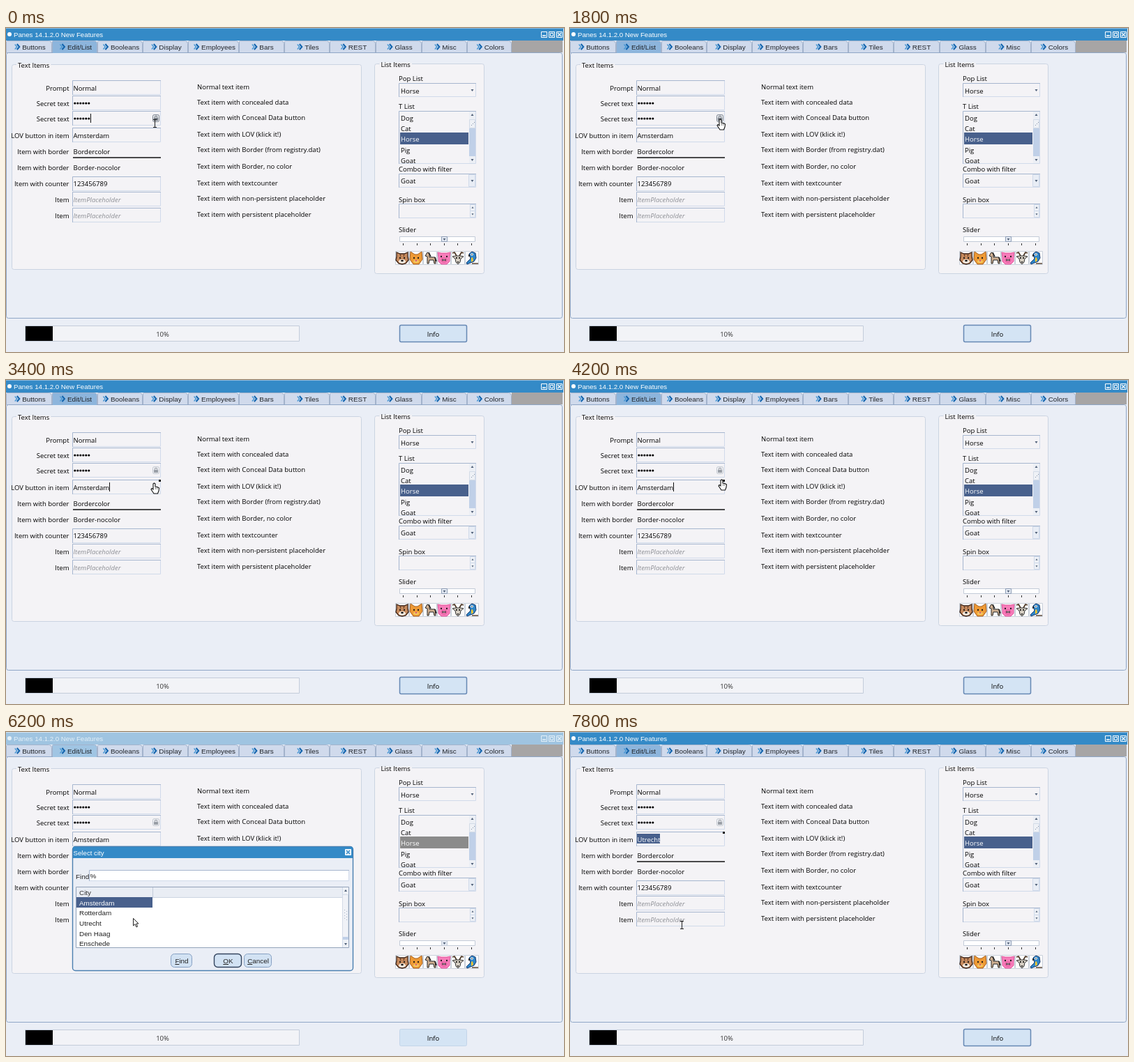
Write an HTML page with a canvas that moves like this. It is 800x465 px and loops after 8000 ms.

```html
<!DOCTYPE html>
<html lang="en">
<head>
<meta charset="utf-8">
<title>New Features</title>
<style>
  html, body { margin: 0; width: 100%; height: 100%; overflow: hidden; background: #eaeef6; }
  canvas { display: block; }
</style>
</head>
<body>
<canvas id="stage" width="800" height="465"></canvas>
<script>
const ctx = document.getElementById('stage').getContext('2d');
const SANS = '9.5px "Open Sans", sans-serif';
const ARIAL = '9.9px "Liberation Sans", Arial, sans-serif';
const TITLE = '9.7px "Liberation Sans", Arial, sans-serif';
const BLUE = '#348ac7', BG = '#eaeef6', PANEL = '#f4f3f6', NAVY = '#48608c';
const EDGE = '#a6b6cf', PALE = '#d0daea', TRACK = '#c0d0e8', INK = '#000';

const LOOP = 8000, TICK = 200;
const REVEAL = 800, CONCEAL = 1800, FOCUS_CITY = 3400, OPEN = 4600, PICK = 7000, CLOSE = 7600;

// Pointer stops: time, x, y of the hot spot, shape.
const stops = [
  [0, 213, 137, 'beam'], [400, 214, 130, 'hand'], [1200, 216, 128, 'hand'],
  [1800, 215, 131, 'hand'], [2200, 203, 145, 'beam'], [2600, 189, 152, 'beam'],
  [3000, 191, 152, 'beam'], [3400, 212, 148, 'hand'], [3800, 220, 144, 'hand'],
  [4600, 214, 142, 'arrow'], [5200, 214, 142, 'arrow'], [6200, 182, 267, 'arrow'],
  [6800, 162, 274, 'arrow'], [7600, 160, 277, 'beam'], [8000, 160, 277, 'beam']
];

function rect(x, y, w, h, color) {
  ctx.fillStyle = color;
  ctx.fillRect(x, y, w, h);
}

function paint(fill, stroke, width = 1) {
  if (fill) { ctx.fillStyle = fill; ctx.fill(); }
  if (stroke) { ctx.strokeStyle = stroke; ctx.lineWidth = width; ctx.stroke(); }
}

function box(x, y, w, h, fill, stroke, radius = 0, width = 1) {
  ctx.beginPath();
  ctx.roundRect(x + .5, y + .5, w - 1, h - 1, radius);
  paint(fill, stroke, width);
}

function trace(points) {
  ctx.beginPath();
  for (let i = 0; i < points.length; i += 2) ctx.lineTo(points[i], points[i + 1]);
}

function line(points, color, width) {
  trace(points);
  paint(null, color, width);
}

function poly(points, fill, stroke, width) {
  trace(points);
  ctx.closePath();
  paint(fill, stroke, width);
}

function oval(x, y, rx, ry, fill, stroke) {
  ctx.beginPath();
  ctx.ellipse(x, y, rx, ry, 0, 0, 7);
  paint(fill, stroke);
}

// y is the middle of the capital letters.
function text(s, x, y, color = INK, font = SANS, align = 'left') {
  ctx.font = font;
  ctx.textAlign = align;
  ctx.fillStyle = color;
  ctx.fillText(s, x, Math.round(y + 3.6));
}

function triangle(x, y, dir, size = 2, color = '#506078') {
  poly([x - size, y - dir * size / 2, x + size, y - dir * size / 2, x, y + dir * size / 2 + dir], color);
}

function cross(x, y, color) {
  line([x, y, x + 5, y + 5], color, 1.3);
  line([x + 5, y, x, y + 5], color, 1.3);
}

function field(x, y, w, h, fill = PANEL) {
  box(x, y, w, h, fill, PALE);
  line([x + .5, y + h, x + .5, y + .5, x + w, y + .5], EDGE);
}

function windowFrame(active) {
  const light = active ? '#fff' : '#e4f0f8';
  rect(0, 0, 800, 465, BG);
  rect(0, 1, 799, 17, active ? BLUE : '#9fc4e1');
  rect(0, 0, 800, 1, active ? '#8fb9dc' : '#d5e4f0');
  oval(5, 9, 3, 3, light);
  text('Panes 14.1.2.0 New Features', 11, 9, light, TITLE);
  for (const x of [767, 778, 789]) box(x, 5, 9, 9, null, light);
  line([769, 11, 774, 11], light, 1.5);
  box(780, 7, 5, 5, null, light);
  cross(791, 7, light);
}

function tabs(active) {
  const names = ['Buttons', 'Edit/List', 'Booleans', 'Display', 'Employees', 'Bars', 'Tiles', 'REST', 'Glass', 'Misc', 'Colors'];
  const edges = [0, 66, 131, 196, 261, 334, 399, 464, 530, 596, 661, 725];
  const current = active ? '#8db5dc' : '#a0c5e3';
  rect(725, 18, 73, 17, '#a7a5a5');
  names.forEach((name, i) => {
    const x = edges[i], w = edges[i + 1] - x, center = x + w / 2 + 7;
    box(x, 18, w, 18, i === 1 ? current : '#d0daec', '#a3b3cc', [1, 4, 0, 0]);
    text(name, center, 27, '#22262c', ARIAL, 'center');
    const left = center - ctx.measureText(name).width / 2 - 10.5;
    line([left, 23.5, left + 3, 27, left, 30.5], '#4b9ad6', 1.5);
    line([left + 3, 23, left + 6.5, 27, left + 3, 31], '#1264ae', 2);
  });
  box(0, 35, 798, 382, BG, '#8fa6c6', 3);
  line([67, 35.5, 130, 35.5], current);
}

function group(x, y, w, h, title, titleX) {
  box(x, y, w, h, PANEL, '#cbd4e2', 3);
  ctx.font = SANS;
  rect(titleX - 2, y - 1, ctx.measureText(title).width + 4, 4, PANEL);
  text(title, titleX, y + 1);
}

function dots(y) {
  for (let i = 0; i < 6; i++) oval(98.8 + i * 4, y, 1.6, 1.6, INK);
}

function lockIcon(hover, open) {
  const metal = hover ? '#777d86' : '#9a9fa7';
  box(210, 124, 10, 11, hover ? '#e3e6ea' : '#eeeff3', hover ? '#7c8490' : '#c3c8d0', 2);
  rect(212, 129, 6, 4, metal);
  line([213.5, 129, 213.5, 126.5, 216.5, 126.5, 216.5, open ? 127 : 129], metal);
}

function textItems(t) {
  group(8, 52, 502, 295, 'Text Items', 17);
  const rows = [
    ['Prompt', 'Normal text item', 86, 84],
    ['Secret text', 'Text item with concealed data', 108, 106],
    ['Secret text', 'Text item with Conceal Data button', 130, 128.5],
    ['LOV button in item', 'Text item with LOV (klick it!)', 154, 152],
    ['Item with border', 'Text item with Border (from registry.dat)', 177, 174.5],
    ['Item with border', 'Text item with Border, no color', 200.5, 198],
    ['Item with counter', 'Text item with textcounter', 223.5, 222],
    ['Item', 'Text item with non-persistent placeholder', 246, 244],
    ['Item', 'Text item with persistent placeholder', 269, 267]
  ];
  const values = ['Normal', null, null, null, 'Bordercolor', 'Border-nocolor', '123456789', 'ItemPlaceholder', 'ItemPlaceholder'];
  rows.forEach(([label, note, y, noteY], i) => {
    text(label, 90.5, y, INK, SANS, 'right');
    text(note, 274, noteY);
    if (i < 4 || i > 5) field(95, Math.round(y) - 11, 127, 21);
    if (values[i]) text(values[i], 96.5, y, i > 6 ? '#8e9096' : INK, i > 6 ? 'italic ' + SANS : SANS);
  });
  line([96, 186, 222, 186], '#111', 1.6);
  dots(108);

  const revealed = t >= REVEAL && t < CONCEAL;
  if (revealed) text('Secret', 96.5, 130); else dots(130);
  if (t < 400) line([121.5, 123, 121.5, 136], '#111');
  lockIcon(t < 2200, revealed);

  const chosen = t >= CLOSE;
  if (chosen) rect(96, 146, 33, 14, NAVY);
  text(chosen ? 'Utrecht' : 'Amsterdam', 96.5, 154, chosen ? '#fff' : INK);
  if (chosen || (t >= FOCUS_CITY && t < OPEN)) {
    rect(219, 143, 3, 3, '#111');
    if (!chosen) line([148.5, 147, 148.5, 160], '#111');
  }
}

function animals() {
  for (let i = 0; i < 6; i++) box(558 + i * 20, 320, 20, 20, '#fcfcfc', '#c9d0da');
  const eyes = (x, y, gap = 3) => { oval(x - gap, y, 1, 1.2, '#111'); oval(x + gap, y, 1, 1.2, '#111'); };
  // fox
  poly([560, 322, 565, 324, 571, 324, 576, 322, 576, 328, 577, 333, 573, 338, 568, 339, 563, 338, 559, 333, 560, 328], '#c58a5e', '#3a2116', 1.3);
  oval(568, 335, 5, 3, '#f4eadf');
  line([565, 324, 566, 328], '#5b3420');
  line([571, 324, 570, 328], '#5b3420');
  eyes(568, 330);
  oval(568, 334, 1.8, 1.2, '#111');
  // cat
  poly([580, 321, 586, 325, 590, 325, 596, 321, 597, 332, 592, 339, 584, 339, 579, 332], '#ee9a35', '#a65f1e');
  eyes(588, 330);
  oval(588, 335, 4, 2.2, '#f4c85d');
  oval(588, 334, 1.5, 1, '#d7537c');
  // horse
  poly([601, 327, 604, 322, 607, 324, 607, 329, 615, 329, 616, 338, 614, 338, 613, 333, 607, 333, 606, 338, 604, 338, 604, 328], '#d0b193', '#222');
  line([606, 322, 609, 328], '#222', 1.6);
  line([615, 329, 617, 335], '#222', 1.6);
  // pig
  poly([619, 322, 624, 323, 632, 323, 637, 322, 636, 329, 636, 335, 632, 339, 624, 339, 620, 335, 620, 329], '#f77dba', '#e0559c');
  eyes(628, 328, 4);
  oval(628, 333, 4, 2.8, '#fba4cf', '#d8408c');
  eyes(628, 333, 1.5);
  // goat
  line([640, 323, 643, 322, 646, 327], '#4f3a28', 1.8);
  line([656, 323, 653, 322, 650, 327], '#4f3a28', 1.8);
  poly([640, 328, 645, 327, 651, 327, 656, 328, 652, 331, 651, 336, 648, 339, 645, 336, 644, 331], '#d8d1c5', '#333');
  eyes(648, 330, 2);
  oval(648, 336, 1.5, 1, '#333');
  // parrot
  poly([664, 324, 668, 321, 673, 323, 674, 330, 671, 335, 661, 339, 660, 337, 666, 331], '#2f86c8', '#173a70');
  line([668, 338, 677, 338], '#5b4636', 1.5);
  poly([667, 330, 669, 329, 670, 334, 667, 336], '#f1c52e');
  oval(668, 325, 2, 1.7, '#fff');
  oval(668, 325, .8, .8, '#111');
  line([664, 325, 664, 328], '#222', 1.8);
}

function listItems(active) {
  group(528, 51, 158, 302, 'List Items', 537.5);
  text('Pop List', 563, 72.5);
  field(563, 79, 111, 20);
  text('Horse', 566, 90);
  triangle(668.5, 89, 1);

  text('T List', 563, 112.5);
  field(563, 119, 111, 76);
  ctx.save();
  ctx.beginPath();
  ctx.rect(563, 119, 111, 75);
  ctx.clip();
  rect(565, 150, 98, 17, active ? NAVY : '#8b8b8b');
  ['Dog', 'Cat', 'Horse', 'Pig', 'Goat'].forEach((name, i) =>
    text(name, 566, 129 + i * 15.4, i === 2 ? '#fff' : INK));
  ctx.restore();
  rect(664, 120, 9, 74, '#eceff5');
  rect(664, 144, 9, 40, TRACK);
  box(664, 131, 9, 13, '#eef1f6', '#d3dbe7');
  for (let i = 0; i < 3; i++) rect(667 + i * 2, 139 - i * 2, 1, 1, '#8795aa');
  triangle(668.5, 125, -1);
  triangle(668.5, 189, 1);

  text('Combo with filter', 563, 202.5);
  field(563, 209, 111, 20);
  box(663, 210, 10, 18, '#e8edf5', PALE);
  text('Goat', 566, 219.5);
  triangle(668.5, 219, 1);

  text('Spin box', 563, 246);
  field(563, 252, 111, 21);
  box(665, 253, 8, 10, '#eef1f6', PALE);
  box(665, 262, 8, 10, '#eef1f6', PALE);
  triangle(669, 258, -1, 1.5);
  triangle(669, 267, 1, 1.5);

  text('Slider', 563, 289.5);
  box(564, 299, 109, 8, '#fff', '#c3cbd8');
  box(624, 299, 9, 8, '#e4eaf3', active ? '#8d9db5' : '#c3cbd8');
  triangle(628.5, 303, 1, 2);
  for (let i = 0; i < 6; i++) rect(569 + Math.round(i * 19.5), 309, 1, 3, '#333');
  animals();
}

function footer(active) {
  box(27, 427, 394, 23, '#f2f3f7', '#c3ccda');
  rect(28, 428, 39, 21, '#000');
  text('10%', 224.5, 439.5, '#333', SANS, 'center');
  box(564, 426, 97, 25, '#d4e4f4', active ? '#6688b4' : '#c3d5e9', 2, active ? 1.5 : 1);
  text('Info', 612.5, 439.5, INK, SANS, 'center');
}

function dialogButton(label, x, w, isDefault) {
  const center = x + w / 2 + .5;
  box(x, 318, w, 20, '#d2e2f3', isDefault ? '#34455f' : '#86a0c2', 5, isDefault ? 1.4 : 1);
  text(label, center, 328, '#222', ARIAL, 'center');
  const left = center - ctx.measureText(label).width / 2;
  line([left, 333.5, left + ctx.measureText(label[0]).width, 333.5], '#222');
}

function dialog(selected) {
  box(95, 164, 403, 179, BG, '#4a7fb0', 4, 1.4);
  rect(96, 165, 401, 16, BLUE);
  text('Select city', 96.5, 173, '#fff', TITLE);
  box(486, 168, 9, 9, '#dcebf6', '#fff');
  cross(488, 170, BLUE);

  text('Find', 100, 207, '#222', ARIAL);
  field(119, 198, 373, 16, '#fff');
  text('%', 120.5, 206.5, '#222', ARIAL);

  box(100, 222, 392, 88, '#fff', '#93a3ba');
  rect(101, 223, 381, 14, '#e9edf4');
  line([101, 237.5, 482, 237.5], '#ccd5e2');
  line([210.5, 223, 210.5, 237], '#c3ccda');
  text('City', 105, 230.5, '#333', ARIAL);
  rect(101, 237 + Math.round(selected * 14.7), 109, 15, NAVY);
  ['Amsterdam', 'Rotterdam', 'Utrecht', 'Den Haag', 'Enschede'].forEach((city, i) =>
    text(city, 105, 245 + i * 14.7, i === selected ? '#fff' : '#222', ARIAL));

  rect(482, 223, 9, 86, '#eef1f6');
  line([482.5, 223, 482.5, 309], PALE);
  box(482, 233, 9, 62, '#f0f2f7', '#d3dbe7');
  for (let i = 0; i < 8; i++) rect(485 + (i % 2) * 3, 255 + i * 2, 1, 1, '#a9b4c4');
  rect(483, 294, 8, 4, TRACK);
  triangle(487, 228, -1);
  triangle(487, 304, 1);

  dialogButton('Find', 236, 31);
  dialogButton('OK', 298, 40, true);
  dialogButton('Cancel', 341, 40);
}

function pointer(t) {
  const i = stops.findLastIndex(s => s[0] <= t);
  const [t0, x0, y0, shape] = stops[i], [t1, x1, y1] = stops[i + 1];
  const k = (t - t0) / (t1 - t0);
  ctx.save();
  ctx.translate(Math.round(x0 + (x1 - x0) * k), Math.round(y0 + (y1 - y0) * k));
  if (shape === 'beam') {
    line([.5, -5, .5, 5], '#222');
    line([-2, -5.5, 3, -5.5], '#222');
    line([-2, 5.5, 3, 5.5], '#222');
  } else if (shape === 'arrow') {
    poly([.5, .5, .5, 11, 3, 8.7, 5, 13, 6.6, 12.2, 4.8, 8, 8, 8], '#fff', '#222');
  } else {
    poly([-1, 1, .5, 0, 2, 1, 2, 5, 5, 5.5, 7.5, 7, 7, 11, 5.5, 15, 0, 15, -4, 9, -3, 7.5, -1, 9], '#fff', '#111', 1.1);
    line([2.5, 6, 2.5, 9], '#555', .7);
    line([4.7, 6, 4.7, 9], '#555', .7);
  }
  ctx.restore();
}

function draw(now) {
  const t = Math.floor(now % LOOP / TICK) * TICK;
  const modal = t >= OPEN && t < CLOSE;
  windowFrame(!modal);
  tabs(!modal);
  textItems(t);
  listItems(!modal);
  footer(!modal);
  if (modal) dialog(t >= PICK ? 2 : 0);
  pointer(t);
  requestAnimationFrame(() => draw(performance.now()));
}
draw(performance.now());
</script>
</body>
</html>
```
